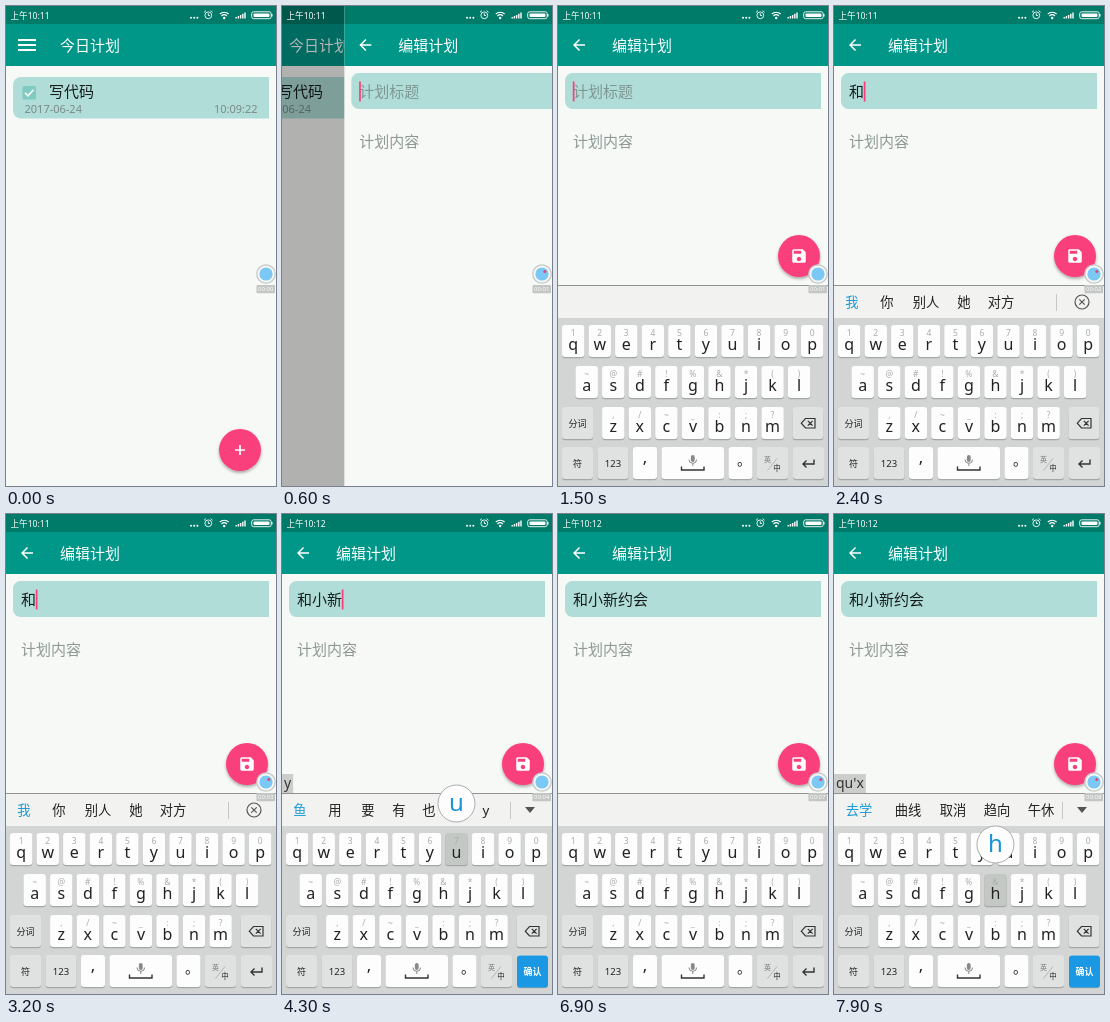
Recreate the animation shown at these times as an HTML page. Size 270 by 480 pixels, loop 8000 ms.

```html
<!DOCTYPE html>
<html lang="zh-CN">
<head>
<meta charset="utf-8">
<title>编辑计划</title>
<style>
  html, body { margin: 0; width: 100%; height: 100%; overflow: hidden; background: #f7f9f6; }
  svg { display: block; width: 100%; height: 100%; }
  text { font-family: "Noto Sans", "Noto Sans CJK SC", "Noto Sans CJK", sans-serif; white-space: pre; }
  .t15 { font-size: 15px; }
  .mid { text-anchor: middle; }
  .small { font-size: 11px; fill: #7b8a88; }
  .hint { fill: #8e9995; }
  .white { fill: #fff; }
  .line { fill: none; stroke: #fff; }
  .key { fill: #fdfdfd; }
  .key.fn { fill: #dfe2e0; }
  .key.down { fill: #c4c8c5; }
  .letter { font-size: 16px; fill: #222; }
  .mark { font-size: 8.5px; fill: #a9adab; }
  .fn-label { font-size: 9px; fill: #222; }
  .cand { font-size: 13.3px; fill: #222; }
  .cand.first { fill: #1c9ad6; }
</style>
</head>
<body>
<svg viewBox="0 0 270 480" preserveAspectRatio="none">
  <defs>
    <filter id="shade" x="-30%" y="-30%" width="160%" height="170%">
      <feDropShadow dx="0" dy="1.8" stdDeviation="1.8" flood-opacity=".33"/>
    </filter>
    <g id="bars">
      <rect width="270" height="480" fill="#f7f9f6"/>
      <rect width="270" height="18" fill="#007a69"/>
      <rect y="18" width="270" height="42" fill="#009688"/>
    </g>
  </defs>

  <g id="list">
    <use href="#bars"/>
    <path class="line" stroke-width="2" d="M12 34H30M12 39H30M12 44H30"/>
    <text class="t15 white" x="54" y="44.5">今日计划</text>
    <path fill="#b0ddd8" d="M263 71V112.500H15a8 8 0 0 1-8-8V79a8 8 0 0 1 8-8z"/>
    <rect x="16.500" y="80" width="13.500" height="13.500" rx="1.500" fill="#7fcbc1"/>
    <path class="line" stroke-width="1.600" d="M19 86.800l3 3 5.500-6"/>
    <text class="t15" x="43" y="91" fill="#151d1c">写代码</text>
    <text class="small" x="18.500" y="107">2017-06-24</text>
    <text class="small" x="208" y="107">10:09:22</text>
    <circle cx="234" cy="444" r="21" fill="#fa3f7c" filter="url(#shade)"/>
    <path class="line" stroke-width="1.700" d="M229 444H239M234 439V449"/>
  </g>
  <rect id="dim" width="270" height="480"/>

  <g id="edit">
    <use href="#bars"/>
    <path class="white" transform="translate(12 30) scale(.75)" d="M20 11H7.830l5.590-5.590L12 4l-8 8 8 8 1.410-1.410L7.830 13H20z"/>
    <text class="t15 white" x="54" y="44.500">编辑计划</text>
    <path fill="#b0ddd8" d="M263 67V103H14.500a7.500 7.500 0 0 1-7.500-7.500V74.500a7.500 7.500 0 0 1 7.500-7.500z"/>
    <text id="title" class="t15" x="15" y="91"></text>
    <text class="t15 hint" x="15" y="141">计划内容</text>
    <rect id="caret" width="1.700" height="20" fill="#fa3f7c"/>
    <g id="save">
      <circle cx="241" cy="250" r="21" fill="#fa3f7c" filter="url(#shade)"/>
      <path class="white" transform="translate(232 241) scale(.75)" d="M17 3H5c-1.110 0-2 .9-2 2v14c0 1.100.890 2 2 2h14c1.100 0 2-.9 2-2V7l-4-4zm-5 16c-1.660 0-3-1.340-3-3s1.340-3 3-3 3 1.340 3 3-1.340 3-3 3zm3-10H5V5h10v4z"/>
    </g>
  </g>

  <g id="status">
    <text id="clock" class="white" x="4.500" y="12.500" font-size="8.600"></text>
    <g class="white">
      <circle cx="185" cy="11.700" r="1"/><circle cx="188.200" cy="11.700" r="1"/><circle cx="191.400" cy="11.700" r="1"/>
      <path d="M229.500 12.500h1.400v-1.500h-1.400zM231.700 12.500h1.400v-2.500h-1.400zM233.900 12.500h1.400v-3.600h-1.400zM236.100 12.500h1.400v-4.800h-1.400zM238.300 12.500h1.400v-6h-1.400z"/>
      <rect x="247.500" y="7.400" width="16" height="3.700" rx="1"/>
    </g>
    <g class="line" stroke-width=".9">
      <circle cx="202.300" cy="9.300" r="3.400"/>
      <path d="M202.300 7.200v2.300h1.700M198 6.300l2-1.700M206.600 6.300l-2-1.700"/>
      <path stroke-width="1.200" d="M213.800 8a6.400 6.400 0 0 1 8.800 0M215.500 10a3.900 3.900 0 0 1 5.400 0"/>
      <rect x="245.700" y="5.800" width="19.500" height="6.900" rx="2"/>
    </g>
    <circle class="white" cx="218.200" cy="12" r="1.200"/>
    <rect class="white" x="265.300" y="8" width="1.200" height="2.500"/>
  </g>

  <g id="comp">
    <rect id="compBox" y="260" height="19" fill="#cbcecb"/>
    <text id="compText" x="2" y="274" font-size="14" fill="#333"></text>
  </g>

  <g id="board">
    <rect y="279" width="270" height="33" fill="#f2f3f1"/>
    <rect y="279" width="270" height="1" fill="#8f9391"/>
    <rect y="312" width="270" height="168" fill="#d2d5d3"/>
    <g id="cands"></g>
    <g id="closeTool">
      <path stroke="#c5c9c6" d="M222.500 288V305"/>
      <g fill="none" stroke="#555" stroke-width="1.200"><circle cx="248" cy="296" r="7"/><path d="M245.300 293.300l5.400 5.400M250.700 293.300l-5.400 5.400"/></g>
    </g>
    <g id="moreTool">
      <path stroke="#c5c9c6" d="M228.500 288V305"/>
      <path fill="#555" d="M243 293h10l-5 6z"/>
    </g>
    <g id="keys"></g>
    <g fill="none" stroke="#333">
      <path stroke-width="1.200" d="M247.500 412.500H257v9.500H247.500L243.300 417.200zM249.800 414.800l4.800 4.800M254.600 414.800l-4.800 4.800"/>
      <path stroke-width="1.400" d="M123.500 460.500V464H146V460.500"/>
      <path stroke="#888" d="M131 453.500a3.800 3.800 0 0 0 7.600 0M134.800 457.400V460"/>
      <path stroke="#aaa" stroke-width=".8" d="M209.500 464.500L219 452.500"/>
    </g>
    <rect x="132.900" y="449" width="3.800" height="7" rx="1.900" fill="#888"/>
    <path id="enter" fill="none" stroke="#333" stroke-width="1.400" d="M256 453.500V458H245M248.500 454.500L245 458l3.500 3.500"/>
    <g id="confirm">
      <rect x="235" y="441.500" width="31" height="32" rx="3" fill="#1b98e3"/>
      <text class="mid white" x="250.500" y="460.500" font-size="9" font-weight="700">确认</text>
    </g>
  </g>

  <g id="popup">
    <circle r="18.500" fill="#fcfdfc" stroke="#a9aeab"/>
    <text id="popText" class="mid" y="7" font-size="24" fill="#1c93d6"></text>
  </g>

  <g id="badge">
    <circle cx="260" cy="268" r="9.200" fill="#f6f8f7" stroke="#c3cac8" stroke-width="1.300"/>
    <circle cx="260" cy="268" r="6.600" fill="#7cc8f4"/>
    <circle id="dot" cx="262.800" cy="265.600" r="1.500" fill="#e5476c"/>
    <rect x="250.500" y="279" width="18.500" height="8.300" rx="1" fill="#c3c6c4"/>
    <text id="timer" class="mid white" x="259.700" y="285.400" font-size="6"></text>
  </g>
</svg>

<script>
const LOOP = 8000;
const $ = id => document.getElementById(id);
const show = (id, on) => $(id).setAttribute('visibility', on ? 'visible' : 'hidden');
const move = (id, x, y) => $(id).setAttribute('transform', `translate(${x} ${y})`);
const put = (id, s) => { if ($(id).textContent !== s) $(id).textContent = s; };

function add(parent, tag, attrs, text) {
  const n = document.createElementNS('http://www.w3.org/2000/svg', tag);
  for (const k in attrs) n.setAttribute(k, attrs[k]);
  if (text) n.textContent = text;
  return parent.appendChild(n);
}

// keyboard
const keys = {};
function addKey(x, y, w, cls) {
  add($('keys'), 'rect', { x, y: y + 1.2, width: w, height: 32, rx: 3, fill: '#a3a8a5' });
  return add($('keys'), 'rect', { x, y, width: w, height: 32, rx: 3, class: 'key ' + cls });
}
function addRow(letters, marks, x0, y) {
  [...letters].forEach((c, i) => {
    const x = x0 + i * 26.55;
    keys[c] = { x, y, rect: addKey(x - 11.2, y, 22.4, '') };
    add($('keys'), 'text', { class: 'mark mid', x, y: y + 10.5 }, marks[i]);
    add($('keys'), 'text', { class: 'letter mid', x, y: y + 24.5 }, c);
  });
}
function addLabel(s, x, y, size, fill = '#222') {
  add($('keys'), 'text', { class: 'mid', x, y, 'font-size': size, fill }, s);
}
addRow('qwertyuiop', '1234567890', 15.2, 319);
addRow('asdfghjkl', '~@#!%&*()', 28.7, 360);
addRow('zxcvbnm', ',/~_:;?', 55.3, 401);
[[4, 401, 31], [234.5, 401, 31], [4, 441, 31], [39.5, 441, 31], [199, 441, 31], [235, 441, 31]]
  .forEach(([x, y, w]) => addKey(x, y, w, 'fn'));
[[75, 24], [103.5, 62.5], [170.5, 24]].forEach(([x, w]) => addKey(x, 441, w, ''));
addLabel('分词', 19.5, 420.5, 9);
addLabel('符', 19.5, 460.5, 9);
addLabel('123', 55, 460.5, 9.5);
addLabel(',', 87, 457, 17);
addLabel('。', 186, 459, 14);
addLabel('英', 209.500, 455.500, 7, '#777');
addLabel('中', 219, 464.500, 7.5);

// each step: time, title, composing letters, candidates as [text, centre x]
const five = s => [...s].map((c, i) => [c, [18, 53, 86, 117, 147][i]]);
const steps = [
  [0, '', '', []],
  [1700, '', 'h', five('和会好还很')],
  [1950, '', 'he', five('和喝河合何')],
  [2200, '和', '', [['我', 18], ['你', 53], ['别人', 92], ['她', 130], ['对方', 167]]],
  [3700, '和', 'x', five('想下小新许')],
  [3900, '和', "x'x", [['小新', 25], ['学习', 74], ['谢谢', 119], ['信息', 163]]],
  [4000, '和小新', '', []],
  [4200, '和小新', 'y', [...five('鱼用要有也'), ['以', 176], ['y', 204]]],
  [4400, '和小新', 'yu', five('与于鱼雨语')],
  [4600, '和小新', 'yue', five('约月越阅乐')],
  [4800, '和小新', "yue'h", [['约会', 25], ['越好', 74], ['约好', 119]]],
  [5000, '和小新', "yue'hu", [['约会', 25], ['月湖', 74], ['越湖', 119]]],
  [5100, '和小新', "yue'hui", [['约会', 25], ['约', 74], ['月', 119], ['越', 163]]],
  [5400, '和小新约会', '', [['，', 19], ['怎么样', 63.5], ['大作战', 123], ['了', 168], ['去', 198]]],
  [6250, '和小新约会', '', []],
  [7300, '和小新约会', 'q', five('去请前起却')],
  [7600, '和小新约会', 'qu', five('去取区曲趣')],
  [7800, '和小新约会', "qu'x", [['去学', 25], ['曲线', 74], ['取消', 119], ['趋向', 163], ['午休', 207]]]
];
const presses = [['h', 1600], ['e', 1850], ['x', 3600], ['x', 3800], ['y', 4100], ['u', 4300], ['e', 4500],
  ['h', 4700], ['u', 4900], ['i', 5050], ['q', 7200], ['u', 7500], ['x', 7700], ['h', 7900]];
const caretStarts = [400, 2200, 4000, 5450, 6300];
const dotFlips = [550, 1150, 1650, 2600, 3000, 3500, 3750, 4250, 4600, 5080, 5600, 6260, 6750, 7250, 7760];

let shown = null, pressed = null;

function applyStep(step) {
  shown = step;
  const [, title, comp, cands] = step;
  put('title', title || '计划标题');
  $('title').setAttribute('fill', title ? '#151d1c' : '#7f9793');
  put('compText', comp);
  show('comp', comp);
  $('compBox').setAttribute('width', comp ? $('compText').getComputedTextLength() + 4 : 0);
  $('cands').textContent = '';
  cands.forEach(([s, x], i) =>
    add($('cands'), 'text', { class: 'cand mid' + (i ? '' : ' first'), x, y: 301 }, s));
  show('closeTool', !comp && cands.length);
  show('moreTool', comp);
  show('enter', !comp);
  show('confirm', comp);
}

function applyPress(c) {
  if (pressed) keys[pressed].rect.classList.remove('down');
  pressed = c;
  show('popup', c);
  if (!c) return;
  keys[c].rect.classList.add('down');
  move('popup', keys[c].x, keys[c].y - 29.5);
  put('popText', c);
}

const ease = p => 1 - (1 - Math.min(1, Math.max(0, p))) ** 3;

function draw(t) {
  // page change
  const slide = ease((t - 400) / 520);
  move('list', -61 * slide, 0);
  $('dim').setAttribute('opacity', 0.37 * slide);
  move('edit', 270 * (1 - slide), 0);
  move('save', 0, t < 1000 ? 201 : 0);
  move('board', 0, 201 * (1 - ease((t - 1120) / 300)));

  // typing
  const step = steps.filter(s => s[0] <= t).pop();
  if (step !== shown) applyStep(step);
  const press = presses.find(p => t >= p[1] && t < p[1] + 100);
  const c = press ? press[0] : null;
  if (c !== pressed) applyPress(c);

  // caret
  const start = caretStarts.filter(s => s <= t).pop() || 0;
  const inBody = t >= 6250;
  $('caret').setAttribute('x', inBody ? 15 : 14.8 + 15 * step[1].length);
  $('caret').setAttribute('y', inBody ? 125 : 75.5);
  show('caret', (t - start) % 1000 < 500);

  // clock and recorder
  put('clock', t < 3800 ? '上午10:11' : '上午10:12');
  put('timer', '00:0' + Math.max(0, Math.floor(1 + (t - 550) / 1030)));
  show('dot', dotFlips.filter(f => f <= t).length % 2);
}

applyPress(null);
draw(0);
const begin = performance.now();
(function tick() {
  draw((performance.now() - begin) % LOOP);
  requestAnimationFrame(tick);
})();
</script>
</body>
</html>
```
